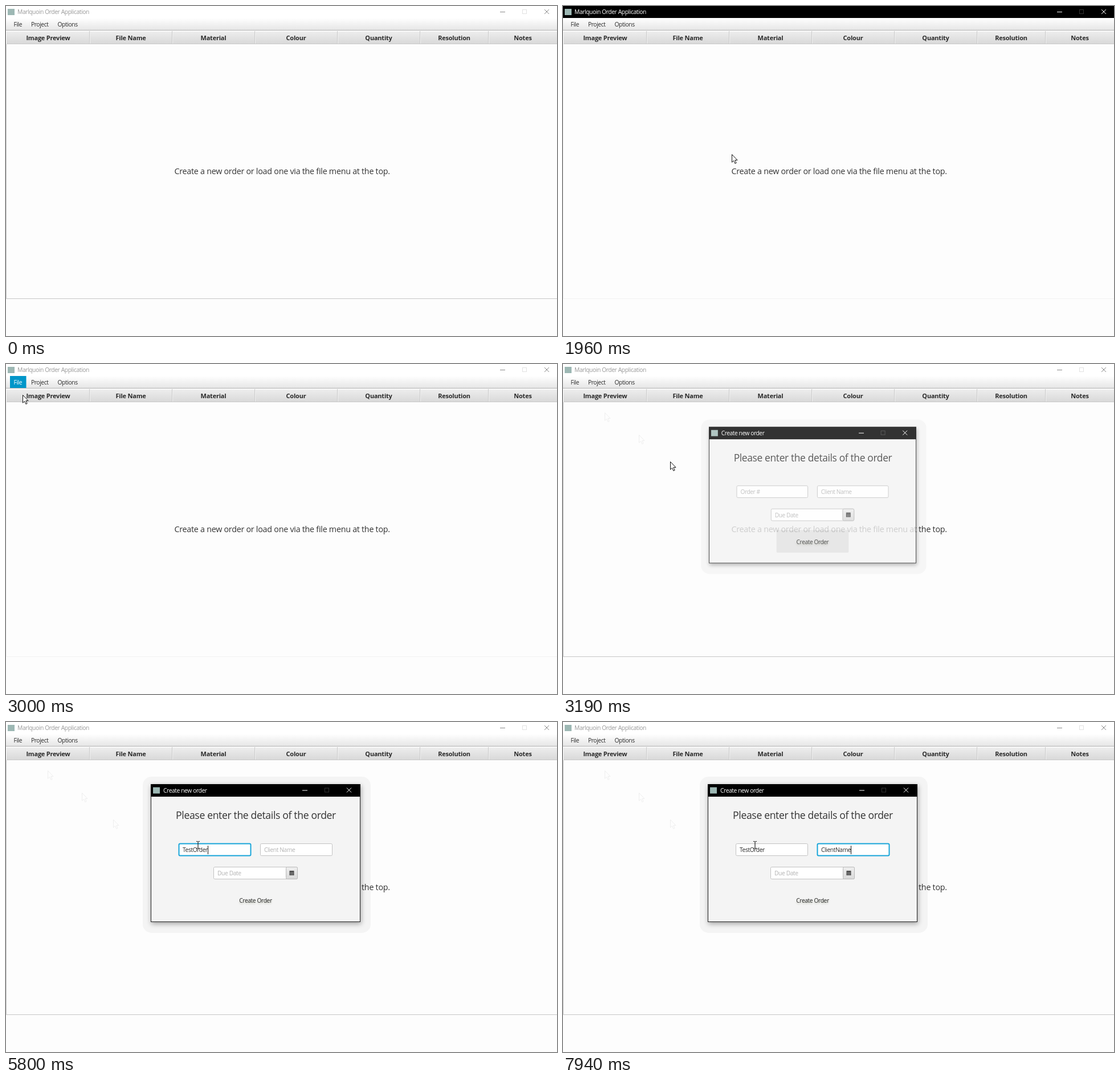
An HTML page that plays this animation: 967x579 px, repeating every 8000 ms.

```html
<!DOCTYPE html>
<html lang="en">
<head>
<meta charset="utf-8">
<title>Order form</title>
<style>
  html, body { margin: 0; width: 100%; height: 100%; overflow: hidden; background: #fdfdfd; }
  svg { display: block; width: 967px; height: 579px; }
  text { font: 10.3px "Open Sans", "Noto Sans", sans-serif; letter-spacing: -.04em; fill: #2a2a2a; white-space: pre; }
  .mid { text-anchor: middle; }
  .head { font-size: 11px; font-weight: 700; letter-spacing: -.02em; }
  .big { font-size: 14.3px; letter-spacing: -.018em; fill: #333; }
  .title { font-size: 17.6px; letter-spacing: -.02em; fill: #333; }
  .prompt { fill: #b3b3b3; }
  .bar { fill: #fff; }
  .bar + text { fill: #999; }
  .glyph { fill: none; stroke: #888; }
  .off { fill: none; stroke: #e2e2e2; }
  .active .bar { fill: #000; }
  .active .bar + text { fill: #fff; }
  .active .glyph { stroke: #fff; }
  .active .off { stroke: #333; }
  .field { fill: #fff; stroke: #c2c2c2; }
  .focus .field { stroke: #18a5d9; stroke-width: 2; }
  .line { fill: none; stroke: #c6c6c6; }
  .shadow { filter: drop-shadow(1px 3px 4px rgba(0, 0, 0, .35)); }
  .soft { text-shadow: 0 2px 3px rgba(90, 100, 60, .35); }
</style>
</head>
<body>
<svg viewBox="0 0 967 579">
  <defs>
    <linearGradient id="menuFill" x2="0" y2="1">
      <stop stop-color="#fff"/><stop offset="1" stop-color="#e6e6e6"/>
    </linearGradient>
    <linearGradient id="headFill" x2="0" y2="1">
      <stop stop-color="#efefef"/><stop offset="1" stop-color="#d9d9d9"/>
    </linearGradient>
    <path id="arrow" d="M.5 .5V14.2L3.6 11.3L5.9 16.4L8.1 15.4L5.9 10.4H10Z" fill="#fff" stroke="#111"/>
  </defs>

  <g id="main"></g>
  <path id="frame" class="line" d="M.5 67V513.5H967"/>
  <text class="big" x="295.5" y="295">Create a new order or load one via the file menu at the top.</text>
  <g id="ghosts" opacity=".06"></g>

  <g id="popup">
    <rect class="shadow" x="7" y="43" width="81" height="58" fill="#f6f6f6"/>
    <rect id="pick" x="7" y="47" width="81" height="25" fill="#0096c9"/>
    <text id="pickText" x="14" y="63">New Order</text>
    <text x="14" y="88">Load Order</text>
  </g>

  <g id="dialog" class="active">
    <rect x="240" y="96" width="400" height="274" rx="15" fill-opacity=".035"/>
    <rect class="shadow" x="254.5" y="109.5" width="367" height="241" fill="#f4f4f4" stroke="#222"/>
    <g id="dialogBar"></g>
    <text class="title mid" x="438.5" y="170">Please enter the details of the order</text>
    <g id="order"></g>
    <g id="client"></g>
    <rect class="field" x="364.5" y="254.5" width="147" height="21" rx="2"/>
    <text class="prompt" x="371" y="269">Due Date</text>
    <rect x="491.5" y="254.5" width="20" height="21" rx="2" fill="url(#headFill)" stroke="#b9b9b9"/>
    <path d="M497.5 261h8v8h-8z" fill="#444"/>
    <path d="M498 263.5h7M498 266.5h7M500.2 264v5M502.8 264v5" stroke="#aaa" stroke-width=".6"/>
    <rect id="button" x="374" y="292" width="128" height="40" rx="2" fill="#e2e2e2"/>
    <text class="mid soft" x="438" y="316.5">Create Order</text>
  </g>

  <use id="pointer" href="#arrow"/>
  <path id="beam" d="M334 209.5H336.5M337.5 209.5H340M337 210V221M334 221.5H336.5M337.5 221.5H340" fill="none" stroke="#222" stroke-width="1.2"/>
</svg>

<script>
const LOOP = 8000, TICK = 47, START = 70;
const $ = id => document.getElementById(id);
const show = (node, on) => node.setAttribute('visibility', on ? 'visible' : 'hidden');

// Caption bar with icon, name and the three window buttons.
function caption(x, y, w, h, name, icon, [min, max, close], textX) {
  const m = y + (h - 1) / 2;
  return `<rect class="bar" x="${x}" y="${y}" width="${w}" height="${h}"/>
    <text x="${textX}" y="${m + 4}">${name}</text>
    <rect x="${icon}" y="${m - 5}" width="12" height="11" fill="#9db8b4"/>
    <path class="glyph" d="M${min} ${m + .5}h9M${close} ${m - 4}l8 8m0 -8l-8 8"/>
    <rect class="off" x="${max + .5}" y="${m - 3.5}" width="7" height="7"/>`;
}

function buildMain() {
  const edges = [1, 146, 291, 436, 581, 726, 846, 967];
  const names = ['Image Preview', 'File Name', 'Material', 'Colour', 'Quantity', 'Resolution', 'Notes'];
  const heads = names.map((name, i) => `
    <text class="head mid" x="${(edges[i] + edges[i + 1]) / 2 + .5}" y="60">${name}</text>
    <path d="M${edges[i + 1] + .5} 44V66" stroke="#cacaca"/>
    <path d="M${edges[i + 1] + 1.5} 44V66" stroke="#f0f0f0"/>`).join('');
  $('main').innerHTML =
    caption(0, 0, 967, 21, 'Marlquoin Order Application', 3, [867, 906, 945], 20) +
    `<rect y="21" width="967" height="21" fill="url(#menuFill)"/>
    <rect id="fileBg" x="7" y="21" width="28.5" height="21" fill="#0096c9"/>
    <text id="fileText" x="13.5" y="36">File</text>
    <text x="44" y="36">Project</text>
    <text x="90.5" y="36">Options</text>
    <rect x="1" y="43" width="966" height="23" fill="url(#headFill)"/>
    <path d="M0 42.5H967" stroke="#b4b4b4"/>
    <path d="M1 44H967" stroke="#f8f8f8" stroke-width="2"/>
    <path d="M1 66.5H967" stroke="#c9c9c9"/>${heads}`;
}

function makeField(id, x, hint, word, times, focusAt, blurAt) {
  const box = $(id);
  box.innerHTML = `<rect class="field" x="${x + .5}" y="213.5" width="126" height="21" rx="2"/>
    <text class="prompt" x="${x + 7}" y="228">${hint}</text>
    <text x="${x + 7}" y="228"></text>
    <rect y="217" width="1" height="15" fill="#111"/>`;
  const [, prompt, text, caret] = box.children;
  return t => {
    const focused = t >= focusAt && t < blurAt;
    const count = times.filter(at => t >= at).length;
    const since = t - (count ? times[count - 1] : focusAt);
    text.textContent = word.slice(0, count);
    box.setAttribute('class', focused ? 'focus' : '');
    show(prompt, !focused && !count);
    // The caret blinks every 510 ms after the latest key.
    show(caret, focused && since % 1020 < 510);
    caret.setAttribute('x', Math.round(x + 7 + (count ? text.getComputedTextLength() : 0)));
  };
}

// Rows of [time, ...values], linear in between.
function sample(rows, t) {
  const i = rows.findIndex(row => row[0] > t);
  if (i === 0) return rows[0].slice(1);
  if (i < 0) return rows[rows.length - 1].slice(1);
  const a = rows[i - 1], b = rows[i], k = (t - a[0]) / (b[0] - a[0]);
  return a.slice(1).map((v, n) => v + (b[n + 1] - v) * k);
}

const path = [
  [70, 765, 518], [164, 590, 400], [305, 240, 225], [446, 116, 162],
  [963, 116, 162], [1010, 122, 168], [1198, 300, 319], [1480, 470, 327], [1668, 548, 329],
  [1809, 542, 303], [1856, 480, 294], [1950, 296, 260], [2044, 196, 200], [2185, 95, 118],
  [2420, 27, 48], [2608, 17, 28], [2702, 17, 28], [2890, 29, 54], [3031, 29, 54],
  [3078, 73, 85], [3125, 133, 124], [3172, 188, 171], [3266, 272, 201], [3454, 337, 215]
];
const opening = [[3078, 0, .93], [3172, .8, .989], [3219, 1, 1]];
const trail = path.slice(19, 22);

buildMain();
$('dialogBar').innerHTML = caption(254, 109, 368, 22, 'Create new order', 258, [520, 559, 598], 276);
$('ghosts').innerHTML = trail.map(([, x, y]) => `<use href="#arrow" x="${x}" y="${y}"/>`).join('');
const fields = [
  makeField('order', 303, 'Order #', 'TestOrder',
    [4590, 4780, 5010, 5150, 5290, 5430, 5610, 5750, 5800], 3570, 5990),
  makeField('client', 446, 'Client Name', 'ClientName',
    [6820, 6960, 7150, 7240, 7330, 7380, 7610, 7660, 7840, 7940], 5990, LOOP)
];

function draw(t) {
  const step = START + Math.floor((t - START) / TICK) * TICK;
  const [x, y] = sample(path, step);
  const [alpha, scale] = sample(opening, step);

  $('main').setAttribute('class', t >= 730 && t < 2960 ? 'active' : '');
  $('frame').style.stroke = t >= 820 && t < 3140 ? '#f2f2f2' : '#c6c6c6';

  const lit = t >= 2515 && t < 3090;
  show($('fileBg'), lit);
  $('fileText').style.fill = lit ? '#fff' : '';
  const open = t >= 2710 && t < 2960;
  const over = y > 44;
  show($('popup'), open);
  show($('pick'), open && over);
  $('pickText').style.fill = over ? '#fff' : '';

  trail.forEach(([at], i) => show($('ghosts').children[i], step > at));

  const dialog = $('dialog');
  dialog.setAttribute('opacity', alpha);
  dialog.setAttribute('transform', `translate(438 230) scale(${scale}) translate(-438 -230)`);
  show($('button'), t < 3266);
  fields.forEach(update => update(t));

  const typing = t >= 3454;
  show($('beam'), typing);
  show($('pointer'), t >= START && !typing);
  $('pointer').setAttribute('transform', `translate(${Math.round(x)} ${Math.round(y)})`);
}

function loop() {
  draw(performance.now() % LOOP);
  requestAnimationFrame(loop);
}
loop();
</script>
</body>
</html>
```
